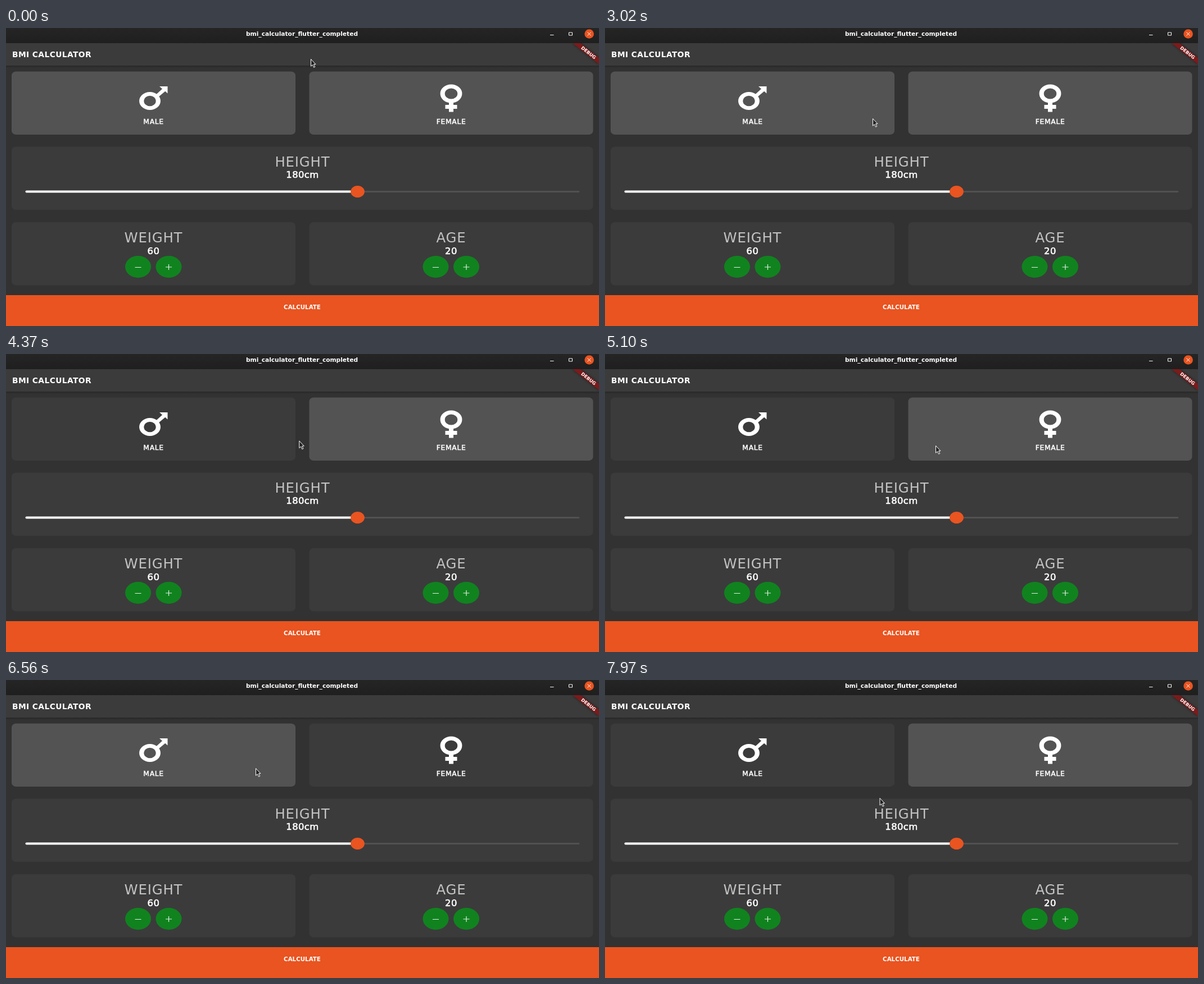
These frames come from a looping animation (1055x531 px, 8000 ms). An HTML page:

```html
<!DOCTYPE html>
<html lang="en">
<head>
<meta charset="utf-8">
<title>BMI Calculator</title>
<style>
html, body { margin: 0; width: 100%; height: 100%; overflow: hidden; background: #323232; }
svg { display: block; width: 1055px; height: 531px; }
text { font-family: "DejaVu Sans", sans-serif; fill: #fff; text-anchor: middle; }
.bold { font-weight: bold; }
.heading { font-size: 13.8px; letter-spacing: .4px; }
.label { font-size: 24.4px; letter-spacing: .8px; fill: #c3c3c3; }
.value { font-size: 16.4px; letter-spacing: .4px; stroke: #fff; stroke-width: .6px; }
.gender { font-size: 12.3px; letter-spacing: .7px; stroke: #fff; stroke-width: .5px; }
.card { fill: #3b3b3b; }
.active { fill: #535353; }
.line { fill: none; stroke: #fff; }
.ring { fill: none; stroke: #fff; stroke-width: 6.9px; }
.sign { fill: none; stroke: #e4efe5; stroke-width: 1.2px; }
#male, #weight { transform: translate(10px, 0); }
#female, #age { transform: translate(539.5px, 0); }
</style>
</head>
<body>
<svg viewBox="0 0 1055 531">
  <defs>
    <linearGradient id="bar" x2="0" y2="1">
      <stop stop-color="#252525"/><stop offset="1" stop-color="#1f1f1f"/>
    </linearGradient>
    <linearGradient id="shade" x2="0" y2="1">
      <stop stop-color="#272727"/><stop offset="1" stop-color="#323232"/>
    </linearGradient>
    <filter id="blur"><feGaussianBlur stdDeviation="2"/></filter>
    <clipPath id="app"><path d="M0 27H1055V531H0Z"/></clipPath>
    <path id="banner" d="M1008 27H1022L1055 53V64.5Z"/>
    <rect id="half" width="505" height="112.5" rx="8" ry="7"/>
    <g id="counter">
      <use href="#half" class="card" y="346"/>
      <g fill="#10831f">
        <ellipse cx="225" cy="425.5" rx="23" ry="19.5"/>
        <ellipse cx="279.5" cy="425.5" rx="23" ry="19.5"/>
      </g>
      <path class="sign" d="M219.5 426.5h11M274 426h11m-5.5-5v10"/>
    </g>
  </defs>

  <rect width="1055" height="531" fill="#323232"/>
  <rect width="1055" height="27" fill="url(#bar)"/>
  <text class="bold" x="526.5" y="14" font-size="10.65">bmi_calculator_flutter_completed</text>
  <path class="line" d="M968 12.5H974.5M1001.5 8H1007.5V13H1001.5Z"/>
  <circle cx="1037.6" cy="10.5" r="8.3" fill="#e95420"/>
  <path class="line" d="M1034.6 7.5l6 6m0-6l-6 6"/>

  <rect y="27" width="1055" height="40" fill="#3b3b3b"/>
  <rect y="67" width="1055" height="4" fill="url(#shade)"/>
  <text class="bold heading" x="81.5" y="52.3">BMI CALCULATOR</text>
  <g clip-path="url(#app)">
    <use href="#banner" filter="url(#blur)" opacity=".5"/>
    <use href="#banner" fill="#7c1b1b"/>
    <text class="bold" transform="translate(1036.5 43.8) rotate(38)" y="2.9" font-size="8">DEBUG</text>
  </g>

  <g id="male">
    <use href="#half" class="card" y="77.5"/>
    <circle class="ring" transform="translate(246 130) scale(1.18 1)" r="12.6"/>
    <path d="M263 104H277.5V116.5L273.2 112.8L261 123L256.5 119L268 108.5Z" fill="#fff"/>
    <text class="gender" x="252.6" y="171.2">MALE</text>
  </g>
  <g id="female">
    <use href="#half" class="card" y="77.5"/>
    <circle class="ring" transform="translate(252.5 117) scale(1.18 1)" r="13"/>
    <path d="M248.5 131h8v6h6.5v7h-6.5v5.5h-8v-5.5h-6.5v-7h6.5Z" fill="#fff"/>
    <text class="gender" x="252.6" y="171.2">FEMALE</text>
  </g>

  <rect class="card" x="10" y="211.5" width="1034.5" height="112.5" rx="8" ry="7"/>
  <text class="label" x="527.4" y="246.8">HEIGHT</text>
  <text class="value" x="527.5" y="267.2">180cm</text>
  <g stroke-linecap="round">
    <path d="M625 291.6H1019" stroke="#535353" stroke-width="2.6"/>
    <path d="M36.5 291.6H625" stroke="#fff" stroke-width="4"/>
  </g>
  <ellipse cx="625.5" cy="291.6" rx="12.4" ry="10.5" fill="#e95420"/>

  <g id="weight">
    <use href="#counter"/>
    <text class="label" x="252.4" y="381.8">WEIGHT</text>
    <text class="value" x="252.4" y="402.5">60</text>
  </g>
  <g id="age">
    <use href="#counter"/>
    <text class="label" x="252.4" y="381.8">AGE</text>
    <text class="value" x="252.4" y="402.5">20</text>
  </g>

  <rect y="476" width="1055" height="55" fill="#e95420"/>
  <text class="bold" x="527" y="500.6" font-size="10.3">CALCULATE</text>

  <path id="cursor" d="M.5 .5V13.2L3.4 10.6L5.6 15.3L7.7 14.3L5.5 9.7H9Z"
        fill="#222" stroke="#fff"/>
</svg>
<script>
const LOOP = 8000;
const STEP = 68; // time between two pointer samples
const LIFT = 0.07; // arc height as a share of the sideways travel
const STOPS = [
  { x: 542, y: 55 },
  { from: 160, to: 300, x: 534, y: 55 },
  { from: 570, to: 840, x: 527, y: 60 },
  { from: 1440, to: 2200, x: 519, y: 159 },
  { from: 2270, to: 2550, x: 476, y: 161 },
  { from: 4230, to: 4970, x: 588, y: 163 },
  { from: 5760, to: 6560, x: 444, y: 157 },
  { from: 7490, to: 7970, x: 488.5, y: 210 }
];
const CLICKS = { male: 3220, female: 5230, maleAgain: 6690 };

const cursor = document.getElementById("cursor");
const maleCard = document.querySelector("#male .card");
const femaleCard = document.querySelector("#female .card");

const easeOut = u => 1 - (1 - u) ** 1.8;

function pointerAt(time) {
  const next = STOPS.findLastIndex(stop => time >= stop.from);
  if (next < 0) return STOPS[0];
  const a = STOPS[next - 1], b = STOPS[next];
  const count = Math.round((b.to - b.from) / STEP) + 1;
  const progress = Math.min(1, (time - b.from) / (b.to - b.from));
  const u = easeOut((1 + Math.floor(progress * (count - 1))) / count);
  const lift = LIFT * Math.abs(b.x - a.x) * Math.sin(Math.PI * u);
  return { x: a.x + (b.x - a.x) * u, y: a.y + (b.y - a.y) * u - lift };
}

function draw(time) {
  const { male, female, maleAgain } = CLICKS;
  maleCard.classList.toggle("active", time < male || (time >= female && time < maleAgain));
  femaleCard.classList.toggle("active", time < female || time >= maleAgain);
  const { x, y } = pointerAt(time);
  cursor.setAttribute("transform", `translate(${x} ${y})`);
}

const origin = performance.now();
function tick() {
  draw((performance.now() - origin) % LOOP);
  requestAnimationFrame(tick);
}
tick();
</script>
</body>
</html>
```
